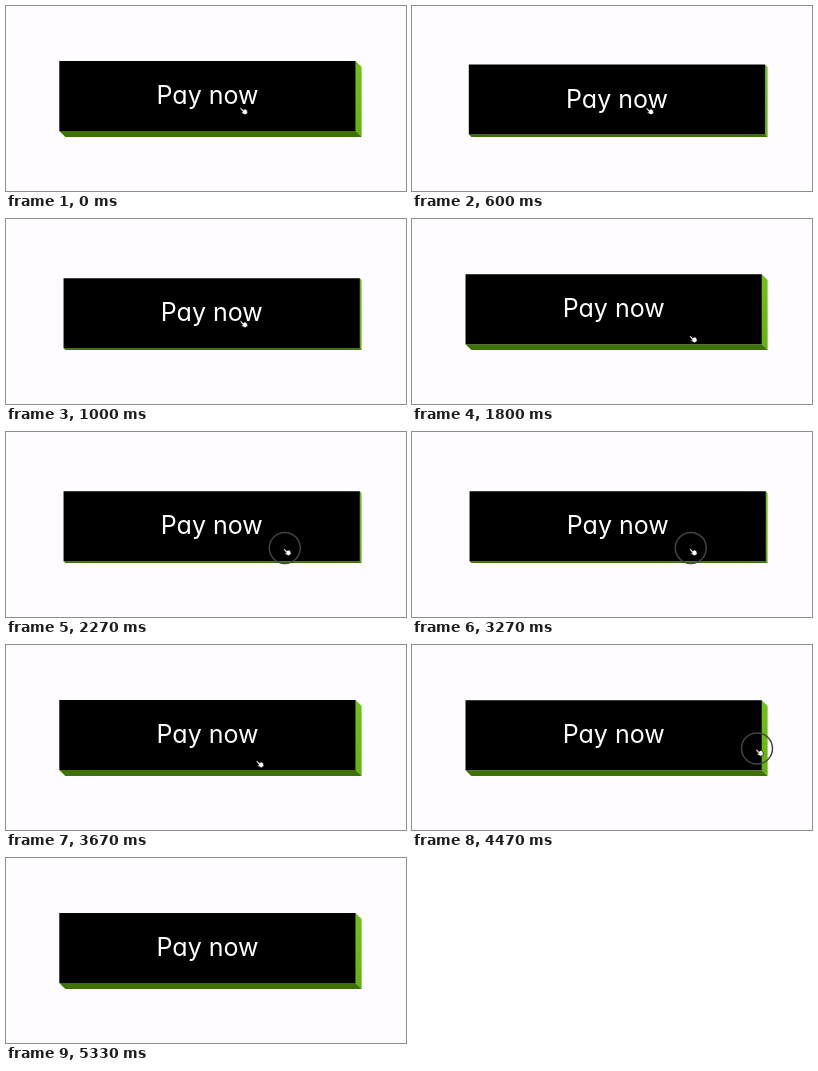
An HTML page that plays this animation: 400x185 px, repeating every 5.94 s.

```html
<!DOCTYPE html>
<html lang="en">
<head>
<meta charset="utf-8">
<title>Pay button</title>
<style>
  html, body { margin: 0; width: 100%; height: 100%; overflow: hidden; background: #fefcff; }
  svg { display: block; width: 400px; height: 185px; }
  text {
    font: 400 25px Inter, "Open Sans", sans-serif;
    font-feature-settings: "cv11";
    fill: #fff;
    text-anchor: middle;
  }
</style>
</head>
<body>
<svg viewBox="0 0 400 185">
  <defs>
    <linearGradient id="lime" x1="0" y1="0" x2="0" y2="1">
      <stop offset="0" stop-color="#70c217"/>
      <stop offset="1" stop-color="#62b30c"/>
    </linearGradient>
  </defs>
  <polygon id="right" fill="url(#lime)"/>
  <polygon id="bottom" fill="#3f7204"/>
  <g id="face">
    <rect width="296.3" height="70"/>
    <text x="148.2" y="43.2">Pay now</text>
  </g>
  <g id="ring">
    <circle r="15.5" fill="none" stroke="#444" stroke-width="1.5"/>
  </g>
  <g id="hand">
    <path transform="translate(-.6 1) rotate(-22) scale(.9)"
      fill="#fff" stroke="#000" stroke-width=".6" stroke-linejoin="round"
      d="M-.9 .3Q-.3-.6 .6 .2L1.9 3.2L3.6 2.8L4.8 3.4L5.6 5L5.2 8.2L1.8 8.8L-1.3 5.6Q-1.6 4.5-.4 4.7L.5 5.2Z"/>
  </g>
</svg>
<script>
const LOOP = 5940, TICK = 1000 / 15;
const LEFT = 53.3, TOP = 55, W = 296.3, H = 70, SIDE = 6;
const $ = id => document.getElementById(id);

// All times below are in ticks
const clicks = [6, 14, 27, 33, 41, 48, 67];
const rings = [6, 16, 25, 33, 41, 48, 66];
const PRESS = 6, RING = 2, GONE = 80;

// Pointer moves: start, duration, then where the fingertip ends
const home = [235.3, 101];
const moves = [
  [19, 6, 278.8, 116],
  [50, 4, 251.5, 115],
  [55, 5, 273, 150.5],
  [62, 4, 345, 103.5],
  [78, 1, 355, 80]
];

const active = (starts, len, k) => starts.find(s => k >= s && k < s + len);

function ease(u) {
  u = Math.min(1, Math.max(0, u));
  return u * u * (3 - 2 * u);
}

function tip(k) {
  return moves.reduce(([x, y], [start, len, tx, ty]) => {
    const u = ease((k - start) / len);
    return [x + (tx - x) * u, y + (ty - y) * u];
  }, home);
}

// Quick push in, slower spring back
function depth(k) {
  const start = active(clicks, PRESS, k);
  if (start === undefined) return 0;
  const u = (k - start + 0.1) / (PRESS - 0.9);
  return 5.5 * Math.sin(Math.PI * u ** 0.7) ** 2;
}

const place = (id, x, y) => $(id).setAttribute("transform", `translate(${x} ${y})`);
const show = (id, on) => $(id).setAttribute("visibility", on ? "visible" : "hidden");

function draw(now) {
  const k = Math.floor((now % LOOP + 5) / TICK);
  const d = depth(k);
  const l = LEFT + d, t = TOP + d, r = l + W, b = t + H;
  const right = LEFT + W + SIDE, low = TOP + H + SIDE;
  $("right").setAttribute("points", `${r},${t} ${right},${TOP + SIDE} ${right},${low} ${r},${b}`);
  $("bottom").setAttribute("points", `${l},${b} ${LEFT + SIDE},${low} ${right},${low} ${r},${b}`);
  place("face", l, t);

  const [x, y] = tip(k);
  place("hand", x, y);
  place("ring", x, y);
  show("hand", k < GONE);
  show("ring", active(rings, RING, k) !== undefined);
}

const begin = performance.now();
function loop() {
  draw(performance.now() - begin);
  requestAnimationFrame(loop);
}
loop();
</script>
</body>
</html>
```
